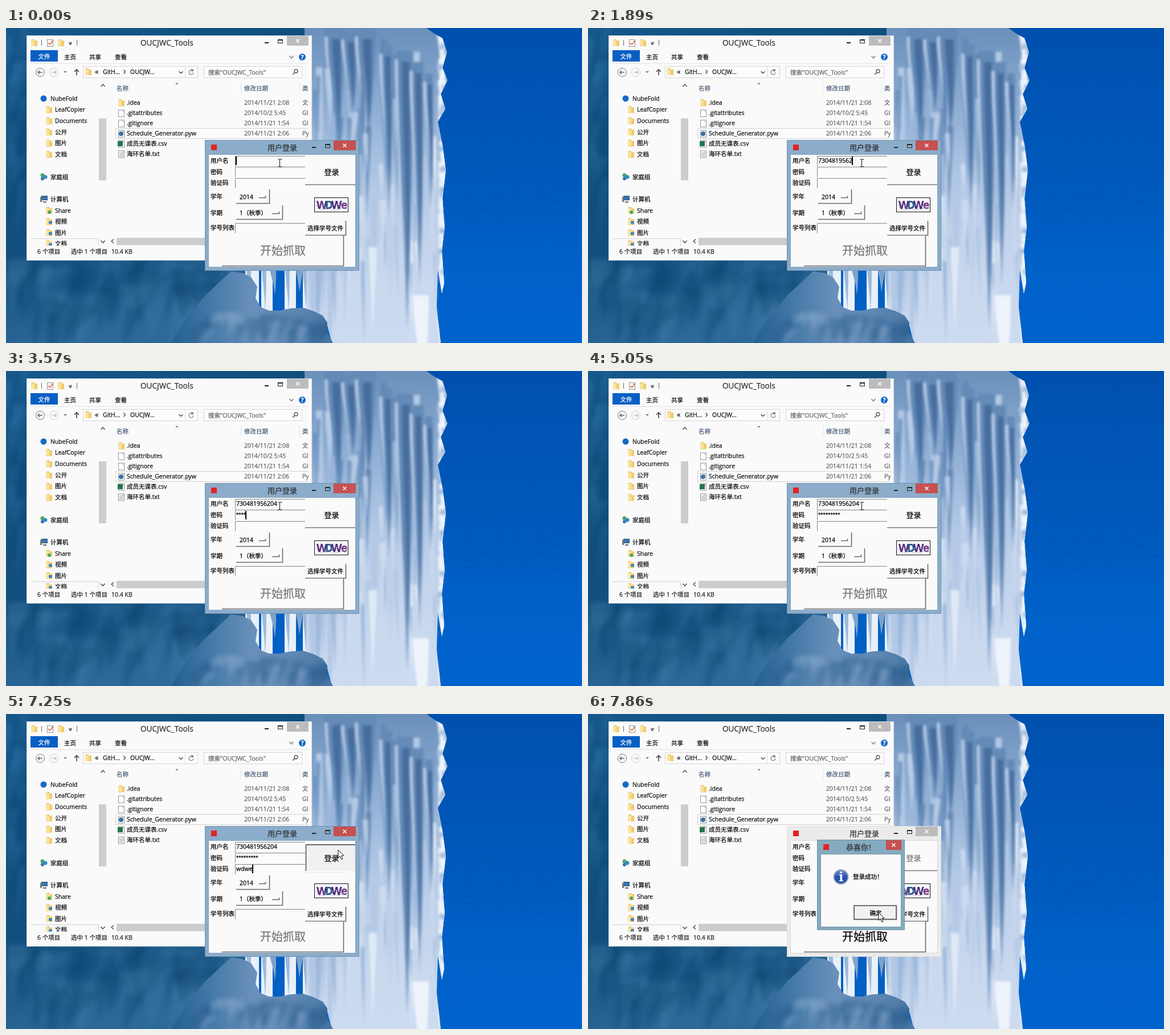
Recreate the animation shown at these times as an HTML page with a canvas. Size 1011 px wide and 554 px high, loop 8000 ms.

```html
<!DOCTYPE html>
<html lang="zh-CN">
<head>
<meta charset="utf-8">
<style>
html, body { margin: 0; width: 100%; height: 100%; overflow: hidden; }
canvas { display: block; }
</style>
</head>
<body>
<canvas id="stage" width="1011" height="554"></canvas>
<script>
const W = 1011, H = 554, LOOP = 8000;
const stage = document.getElementById('stage').getContext('2d');
let g = stage;

// ---- drawing helpers ----
function layer(draw) {
  const c = document.createElement('canvas');
  c.width = W; c.height = H;
  g = c.getContext('2d');
  draw();
  g = stage;
  return c;
}
function box(x, y, w, h, fill, stroke) {
  if (fill) { g.fillStyle = fill; g.fillRect(x, y, w, h); }
  if (stroke) { g.lineWidth = 1; g.strokeStyle = stroke; g.strokeRect(x + .5, y + .5, w - 1, h - 1); }
}
function disc(x, y, r, fill, stroke, width = 1) {
  g.beginPath(); g.arc(x, y, r, 0, 7);
  if (fill) { g.fillStyle = fill; g.fill(); }
  if (stroke) { g.lineWidth = width; g.strokeStyle = stroke; g.stroke(); }
}
function path(...p) {
  g.beginPath();
  for (let i = 0; i < p.length; i += 2) g.lineTo(p[i], p[i + 1]);
}
function line(color, width, ...p) {
  path(...p);
  g.strokeStyle = color; g.lineWidth = width; g.stroke();
}
function poly(color, ...p) {
  path(...p);
  g.closePath(); g.fillStyle = color; g.fill();
}
// y is the middle of the text line; the hairline stroke gives the heavier screen weight
function text(s, x, y, color = '#111', size = 10.5, weight = 400, family = '"Open Sans"') {
  g.font = `${weight} ${size}px ${family}, "Noto Sans CJK SC", "Noto Sans CJK", sans-serif`;
  g.fillStyle = g.strokeStyle = color;
  g.lineWidth = .25;
  g.fillText(s, x, y + size * .37);
  g.strokeText(s, x, y + size * .37);
  return g.measureText(s).width;
}
function chevron(x, y, dx, dy, color = '#444', width = 1.3) {
  if (dy) line(color, width, x - 3.5, y - dy * 2, x, y + dy * 2, x + 3.5, y - dy * 2);
  else line(color, width, x - dx * 2, y - 3.5, x + dx * 2, y, x - dx * 2, y + 3.5);
}
function cross(x, y) {
  line('#fff', 1.5, x - 3, y - 3, x + 3, y + 3);
  line('#fff', 1.5, x + 3, y - 3, x - 3, y + 3);
}
function minMax(x, y) {
  box(x, y + 2, 7, 2, '#222');
  box(x + 23, y - 3, 9, 7, null, '#222');
  box(x + 23, y - 3, 9, 2, '#222');
}
function raised(x, y, w, h) {
  box(x, y, w, h, '#fafafa');
  line('#6a6a6a', 1.6, x, y + h - .5, x + w - .5, y + h - .5, x + w - .5, y);
}
function sunken(x, y, w, h) {
  box(x, y, w, h, '#fbfbfb');
  line('#858585', 1, x + .5, y + h, x + .5, y + .5, x + w, y + .5);
}

// ---- wallpaper ----
function wallpaper() {
  let seed = 11;
  const rnd = () => (seed = seed * 16807 % 2147483647) / 2147483647;
  const gradient = (stops, x1, y1, x2, y2) => {
    const f = g.createLinearGradient(x1, y1, x2, y2);
    stops.forEach((c, i) => f.addColorStop(i / (stops.length - 1), c));
    return f;
  };
  const streak = (x, y, len, w, lean, color) => {
    g.beginPath();
    g.moveTo(x - w, y);
    g.bezierCurveTo(x - w, y + len * .3, x + lean - w * .3, y + len * .5, x + lean, y + len);
    g.bezierCurveTo(x + lean + w * .5, y + len * .5, x + w, y + len * .3, x + w, y);
    g.fillStyle = color; g.fill();
  };
  const soften = px => { g.filter = px ? `blur(${px}px)` : 'none'; };

  box(0, 0, W, H, gradient(['#0050ae', '#0055b5', '#0059bc', '#0061c9', '#0063cb'], 0, 0, 0, H));
  for (let i = 0; i < 150; i++)
    box(780 + rnd() * 225, 255 + (rnd() + rnd()) * 55, 2 + rnd() * 9, 1 + rnd() * 2, 'rgba(0,82,176,.45)');

  // shaded cliff at the left
  box(0, 0, 560, H, gradient(['#16588a', '#0f4c7b', '#124f7e', '#2d6a99'], 0, 0, 160, H));
  soften(5);
  for (let i = 0; i < 44; i++)
    streak(rnd() * 400, 395 + rnd() * 110, 40 + rnd() * 70, 8 + rnd() * 24, -30 + rnd() * 30,
      i % 2 ? 'rgba(8,62,104,.3)' : 'rgba(74,132,175,.22)');
  for (let i = 0; i < 14; i++)
    streak(rnd() * 36, rnd() * 300, 50 + rnd() * 70, 4 + rnd() * 8, -10, 'rgba(46,118,165,.3)');

  // openings and icicles under the login window
  soften(.7);
  box(425, 415, 130, 100, '#0060c4');
  for (const [x, w] of [[432, 12], [458, 10], [499, 10], [528, 7]]) {
    box(x - w, 415, w * 2, 90, '#e9f0f9');
    streak(x - w / 2, 415, 85, 4, 2, '#9db9da');
  }
  streak(468, 415, 55, 6, 4, '#7fa2ca');
  streak(515, 415, 50, 7, 0, '#7fa2ca');

  // ice wall, its tones running from shaded top to bright foot
  soften(0);
  g.save();
  path(524, 0, 738, 0, 752, 10, 766, 18, 774, 43, 766, 70, 775, 92, 763, 116, 771, 142, 758, 165, 766, 205, 772, 250,
    766, 300, 770, 350, 765, 392, 769, 448, 765, 467, 758, 425, 756, 490, 763, 554, 572, 554, 562, 515, 528, 495);
  g.clip();
  box(520, 0, 260, H, gradient(['#6a90bb', '#87a7cf', '#a5bfdf', '#bed0ea', '#c9d8ee', '#cddbf0'], 0, 0, 0, H));
  soften(2);
  for (let i = 0; i < 80; i++) {
    const y = rnd() * 430;
    streak(535 + rnd() * 220, y, 60 + rnd() * 150, 2 + rnd() * 6, -4 + rnd() * 10,
      (y < 190 ? ['#7699c3', '#98b5d8', '#6489b6', '#b4c9e5'] : ['#dfe9f6', '#b3c8e5', '#ccdaef', '#9db9db'])[i % 4]);
  }
  [[578, 0, 210, 16], [604, 5, 150, 13], [632, 0, 190, 17], [668, 30, 300, 10], [700, 40, 490, 15], [722, 60, 400, 11], [742, 80, 240, 7]]
    .forEach(([x, y, len, w]) => {
      streak(x, y, len, w, 4, '#648ab7');
      streak(x + 2, y + 20, len * .8, w * .45, 4, '#466d9e');
      streak(x - w, y + 15, len * .7, 2.5, 8, '#bed1ea');
    });
  // snow along the right edge
  for (let i = 0; i < 60; i++) {
    const y = i * 9;
    streak(763 + rnd() * 9, y - 8, 25 + rnd() * 30, 3 + rnd() * 5, -2, i % 4 ? '#eef4fb' : '#a4bedf');
  }
  streak(728, 470, 190, 14, 4, '#eef4fb');
  g.restore();

  // rounded ledge in front
  g.save();
  path(290, 554, 320, 505, 350, 470, 395, 428, 415, 431, 430, 438, 441, 455, 438, 475, 447, 491, 462, 497,
    480, 497, 500, 493, 522, 492, 540, 498, 556, 506, 564, 518, 563, 534, 574, 554);
  g.clip();
  box(290, 420, 290, 134, gradient(['#235f90', '#457aa8', '#6990ba', '#5f88b4', '#4675a4'], 290, 0, 575, 0));
  soften(4);
  for (let i = 0; i < 24; i++)
    streak(330 + rnd() * 235, 500 + rnd() * 30, 20 + rnd() * 35, 6 + rnd() * 11, -8,
      i % 3 ? 'rgba(42,94,143,.45)' : 'rgba(140,172,207,.4)');
  g.restore();
  soften(0);
}

// ---- file manager ----
function folder(x, y) {
  box(x - 5, y - 6, 6, 12, '#e6b84a');
  box(x - 4, y - 4, 10, 10, '#f0cb68');
  poly('#f8e2a0', x - 5, y - 6, x + 1, y - 4, x + 1, y + 6, x - 5, y + 6);
}
function sheet(x, y) {
  box(x - 5, y - 6, 11, 13, '#fff', '#929292');
  poly('#d3d3d3', x + 2, y - 6, x + 6, y - 2, x + 2, y - 2);
}
function explorer() {
  box(36, 13, 501, 396, '#fafafa', '#d5dfe8');
  folder(49, 26); folder(96, 26);
  sheet(77, 26); line('#d35b38', 1.5, 74, 26, 77, 29, 83, 22);
  line('#666', 1, 62.5, 21, 62.5, 31); line('#666', 1, 124.5, 21, 124.5, 31);
  line('#333', 1, 110, 25.5, 116, 25.5); poly('#333', 110, 27, 116, 27, 113, 30);
  text('OUCJWC_Tools', 236, 26, '#333', 13.6);
  minMax(454, 23);
  box(493, 14, 38, 17, '#bcbcbc'); cross(512, 22.5);

  box(43, 39, 48, 20, '#075fc4'); text('文件', 56.5, 50, '#fff', 10.5, 500);
  ['主页', '共享', '查看'].forEach((s, i) => text(s, [102, 146, 191][i], 51));
  chevron(501, 51, 0, 1, '#777');
  disc(520, 51, 6, '#1267c8'); text('?', 517.7, 51, '#fff', 10, 700);
  line('#e1e4e8', 1, 43, 62.5, 531, 62.5);

  disc(60, 78, 7.5, null, '#777'); disc(84, 78, 7.5, null, '#ccc');
  line('#666', 1.5, 64, 78, 56, 78); line('#666', 1.5, 59, 75, 56, 78, 59, 81);
  line('#c5c5c5', 1.5, 80, 78, 88, 78); line('#c5c5c5', 1.5, 85, 75, 88, 78, 85, 81);
  poly('#777', 101, 76, 107, 76, 104, 79);
  line('#444', 1.6, 124, 83, 124, 73); line('#444', 1.6, 120, 77, 124, 73, 128, 77);
  box(135, 67, 202, 21, '#fcfcfc', '#d5d5d5'); folder(144, 77);
  text('«', 156, 76, '#222', 13); text('GitH...', 170, 77); chevron(208, 77, .7, 0); text('OUCJW...', 218, 77);
  chevron(307, 78, 0, .8); line('#ddd', 1, 314.5, 68, 314.5, 87);
  g.beginPath(); g.arc(325, 78, 4, 0, 5); g.strokeStyle = '#666'; g.lineWidth = 1; g.stroke();
  poly('#666', 325, 72, 330, 74, 326, 77);
  box(347, 67, 173, 21, '#fcfcfc', '#d5d5d5');
  text('搜索"OUCJWC_Tools"', 355, 78, '#686868');
  disc(509, 76, 3, null, '#555', 1.3); line('#555', 1.6, 507, 78, 503, 82);

  // navigation pane
  disc(66, 124, 5.5, '#1469c7'); text('NubeFold', 78, 124);
  ['LeafCopier', 'Documents', '公开', '图片', '文档'].forEach((s, i) => {
    const y = 143.5 + i * 19.7;
    folder(75, y); text(s, 86, y);
  });
  disc(64, 259, 3.5, '#4aa760'); disc(69, 262, 3.5, '#348cc5'); disc(64, 265, 3, '#3b72b8');
  text('家庭组', 78, 262);
  box(62, 295, 11, 8, '#3474ba', '#47586b'); box(60, 297, 3, 9, '#777'); box(65, 305, 6, 2, '#666');
  text('计算机', 78, 301);
  g.save(); g.beginPath(); g.rect(43, 290, 120, 92.5); g.clip();
  ['Share', '视频', '图片', '文档'].forEach((s, i) => {
    const y = 321 + i * 19.5;
    folder(75, y); text(s, 86, y);
    if (i) box(75, y - 1, 6, 5, '#4385bd'); else disc(76, y + 3, 3, '#43a76b');
  });
  g.restore();
  line('#d2d2d2', 1, 43, 370.5, 162.5, 370.5, 162.5, 383);
  chevron(170, 101, 0, -1); chevron(170, 376, 0, 1); box(163, 159, 13, 109, '#cdcdcd');
  chevron(187, 375, -1, 0); box(194, 369, 337, 13, '#cdcdcd');

  // file list
  g.save(); g.beginPath(); g.rect(180, 90, 351, 275); g.clip();
  text('名称', 194, 106, '#4b607b'); text('修改日期', 418, 106, '#4b607b'); text('类', 520, 106, '#4b607b');
  poly('#5d8eae', 297, 99, 303, 99, 300, 96);
  line('#e1e5ea', 1, 412.5, 95, 412.5, 116); line('#e1e5ea', 1, 515.5, 95, 515.5, 116);
  box(192, 176, 345, 19, '#fbfbfb', '#d1d1d1');
  [['.idea', '2014/11/21 2:08', '文'], ['.gitattributes', '2014/10/2 5:45', 'GI'], ['.gitignore', '2014/11/21 1:54', 'GI'],
    ['Schedule_Generator.pyw', '2014/11/21 2:06', 'Py'], ['成员无课表.csv'], ['海环名单.txt']].forEach(([name, date, kind], i) => {
    const y = 131.5 + i * 18;
    (i ? sheet : folder)(202, y);
    text(name, 212, y);
    if (date) { text(date, 418, y, '#666'); text(kind, 520, y, '#666'); }
  });
  disc(202, 186, 4, '#3972a5'); box(196, 199, 9, 9, '#24754b');
  for (let y = 219; y < 227; y += 2) line('#aaa', 1, 199, y + .5, 206, y + .5);
  g.restore();
  text('6 个项目', 55, 393, '#222'); text('选中 1 个项目', 114, 393, '#222'); text('10.4 KB', 185, 393, '#222');
}

// ---- login window ----
const FIELD_Y = [233.5, 253, 272.5];
function loginWindow(active) {
  box(349, 197, 271, 230, active ? '#8bacca' : '#ebebeb', active ? '#7192af' : '#dedede');
  box(355, 222, 259, 199, active ? '#84a4c1' : '#d9d9d9');
  box(356, 223, 257, 197, '#fafafa');
  box(360, 205, 10, 10, '#e12424');
  text('用户登录', 459, 210, '#333', 13);
  minMax(537, 207);
  box(575, 198, 39, 17, active ? '#c75050' : '#bcbcbc'); cross(594.5, 206.5);

  ['用户名', '密码', '验证码', '学年', '学期', '学号列表'].forEach((s, i) =>
    text(s, 359, [...FIELD_Y, 296.5, 325, 351.5][i], '#000', 10.5, 500));
  [225, 244, 264, 343].forEach(y => sunken(402, y, 123, 18));
  raised(404, 284, 59, 25); text('2014', 410, 297, '#000', 10.5, 500); raised(444, 295, 12, 4);
  raised(404, 312, 82, 25); text('1（秋季）', 410, 325, '#000', 10.5, 500); raised(467, 323, 13, 4);
  raised(525, 339, 72, 26); text('选择学号文件', 529, 352, '#000', 10.5, 500);
  raised(379, 365, 214, 54);
  text('开始抓取', 446, 392, active ? '#777' : '#000', 20);

  box(541, 298, 60, 26, '#f8f8fb', '#111');
  line('#c3bdd5', 1, 543, 311, 554, 321, 565, 316, 576, 321, 599, 314);
  [['W', 545, '#592b7c'], ['D', 560, '#24558c'], ['W', 571, '#492b79'], ['e', 588, '#72357c']].forEach(([s, x, c]) =>
    text(s, x, 311, c, 19, 700));
  line('#aeb0d0', .8, 547, 304, 561, 317, 578, 309, 596, 317);
}
function loginButton(state) {
  if (state === 'down') {
    box(525, 224, 88, 56, '#fafafa');
    box(526, 229, 87, 47, '#f1f1f1');
    line('#676767', 1.8, 526.5, 276, 526.5, 230, 613, 230);
    line('#e5e5e5', 1, 527, 278.5, 592, 278.5);
  } else line('#777', 1.5, 525, 275.5, 613, 275.5);
  text('登录', 558.5, 253, state === 'off' ? '#777' : '#000', 13, 500);
}

// ---- message box ----
function okLabel() {
  text('确定', 494.5, 350, '#000', 10.5, 500);
}
function message() {
  box(402, 221, 154, 159, '#84abc0', '#6c93a8');
  box(408, 246, 142, 129, '#7498aa');
  box(409, 247, 140, 127, '#fafafa');
  box(413, 229, 10, 10, '#e12424');
  text('恭喜你！', 453, 234.5, '#333', 13);
  box(523, 222, 27, 17, '#c75050'); cross(536.5, 230.5);
  const blue = g.createLinearGradient(0, 273, 0, 300);
  blue.addColorStop(0, '#7694db'); blue.addColorStop(.5, '#294eb3'); blue.addColorStop(1, '#2352b8');
  disc(444, 286.5, 12.7, blue, '#b7b7be', 2);
  text('i', 440.5, 286, '#fff', 22, 700, '"Noto Serif"');
  text('登录成功！', 465, 286, '#000', 10.5, 500);
  raised(466, 336, 76, 26);
  line('#8a8a8a', 1, 466.5, 362, 466.5, 336.5, 541, 336.5);
  okLabel();
}

// ---- pointers ----
function beam(x, y) {
  line('#111', 1, x, y - 6, x, y + 6);
  line('#111', 1, x - 3, y - 6.5, x + 4, y - 6.5);
  line('#111', 1, x - 3, y + 6.5, x + 4, y + 6.5);
}
function arrow(x, y) {
  g.save(); g.translate(x, y);
  poly('#fff', 0, 0, 0, 14, 3, 11, 6, 17, 8, 16, 5.5, 10.5, 10, 10);
  g.strokeStyle = '#111'; g.lineWidth = 1; g.stroke();
  g.restore();
}

// ---- timeline ----
const USER = '730481956204', CODE = 'wdwe';
const userKeys = [710, 840, 970, 1100, 1230, 1360, 1490, 1620, 1770, 1890, 2040, 2240];
const passKeys = [3120, 3270, 3420, 3570, 3840, 3840, 4010, 4010, 4190];
const codeKeys = [5600, 5880, 6130, 6400];
const caretOff = [[2970, 3120], [5050, 5330], [6130, 6280], [7400, LOOP]];
const pointerPath = [[0, beam, 480.5, 237.5], [6800, beam, 506.5, 239.5], [6950, arrow, 555, 242], [7100, arrow, 583, 239],
  [7560, arrow, 536, 297], [7710, arrow, 513, 344], [7860, arrow, 510, 349]];
const count = (keys, t) => keys.filter(k => k <= t).length;

let desktop, loginOn, loginOff, dialog;

function render(now) {
  const t = now % LOOP, done = t >= 7400;
  g.drawImage(desktop, 0, 0);
  g.drawImage(done ? loginOff : loginOn, 0, 0);
  loginButton(done ? 'off' : t >= 7250 ? 'down' : 'up');

  const widths = [
    text(USER.slice(0, count(userKeys, t)), 404, FIELD_Y[0], '#000'),
    text('*'.repeat(count(passKeys, t)), 404, FIELD_Y[1], '#000', 11, 400, '"Liberation Sans"'),
    text(CODE.slice(0, count(codeKeys, t)), 404, FIELD_Y[2], '#000')
  ];
  const field = count([2440, 4360], t);
  if (!caretOff.some(([a, b]) => t >= a && t < b))
    box(403 + Math.round(widths[field]), [226, 246, 265][field], 2, 15, '#000');

  if (done) {
    g.save();
    if (t < 7560) {
      g.globalAlpha = .67;
      g.translate(478.5, 299); g.scale(.965, .965); g.translate(-478.5, -299);
    }
    g.drawImage(dialog, 0, 0);
    g.restore();
    if (t >= 7860) {
      box(466, 336, 76, 26, '#707070');
      box(468, 338, 72, 22, '#f1f1f1');
      okLabel();
    }
  }
  const [, pointer, x, y] = pointerPath[count(pointerPath.map(p => p[0]), t) - 1];
  pointer(x, y);
  requestAnimationFrame(render);
}

desktop = layer(() => { wallpaper(); explorer(); });
loginOn = layer(() => loginWindow(true));
loginOff = layer(() => loginWindow(false));
dialog = layer(message);
requestAnimationFrame(render);
</script>
</body>
</html>
```
